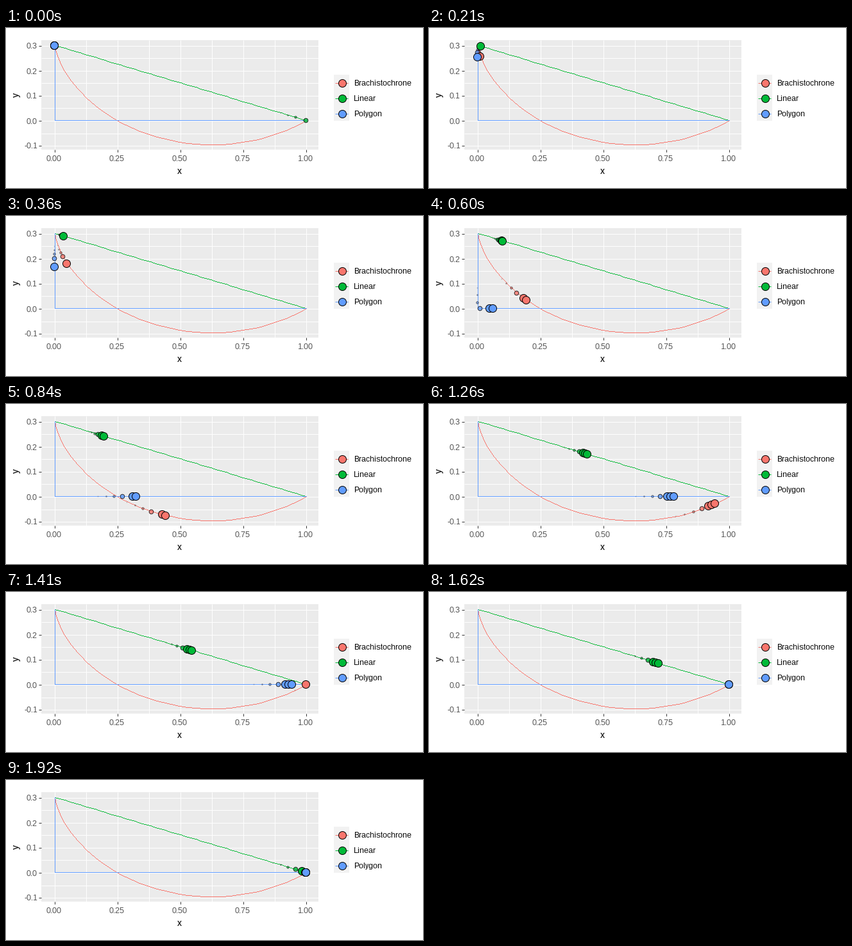
These frames come from a looping animation (650x250 px, 2.7 s). A matplotlib script:

```python
import numpy as np
import matplotlib.pyplot as plt
from matplotlib.animation import FuncAnimation
from matplotlib.colors import to_rgba
from matplotlib.patches import Rectangle

W, H, DPI = 650, 250, 100
PX = 72 / DPI
STEPS, FRAMES, INTERVAL = 64, 90, 30
RED, GREEN, BLUE = "#F8766D", "#00BA38", "#619CFF"
G, DROP = 9.8, 0.3
WAKE = 5
FULL = 6.0

plt.rcParams.update({
    "font.family": "Liberation Sans",
    "text.hinting": "native",
    "text.hinting_factor": 1,
})

# Cycloid through (0, DROP) and (1, 0), angle found by Newton's method
theta_end = 4.18
for _ in range(6):
    f = 1 - np.cos(theta_end) - DROP * (theta_end - np.sin(theta_end))
    theta_end -= f / (np.sin(theta_end) - DROP * (1 - np.cos(theta_end)))
R = 1 / (theta_end - np.sin(theta_end))

# Travel times in seconds
T_LINE = np.sqrt(2 * (1 + DROP ** 2) / (G * DROP))
T_FALL = np.sqrt(2 * DROP / G)
SPEED = np.sqrt(2 * G * DROP)
T_POLY = T_FALL + 1 / SPEED
T_CYC = theta_end * np.sqrt(R / G)


def cycloid(theta):
    return R * (theta - np.sin(theta)), DROP - R * (1 - np.cos(theta))


def brachistochrone(t):
    return cycloid(np.clip(t / T_CYC, 0, 1) * theta_end)


def linear(t):
    x = np.clip(t / T_LINE, 0, 1) ** 2
    return x, DROP * (1 - x)


def polygon(t):
    if t < T_FALL:
        return 0, DROP - G * max(t, 0) ** 2 / 2
    return min((t - T_FALL) * SPEED, 1), 0


RUNNERS = [
    (brachistochrone, T_CYC, RED),
    (linear, np.inf, GREEN),
    (polygon, T_POLY, BLUE),
]


def to_px(x, y):
    """Centre of the pixel that holds a data point."""
    return (np.floor(75.5 + 392 * np.asarray(x)) + 0.5,
            np.floor(144.5 - 391 * np.asarray(y)) + 0.5)


def seconds(step):
    return step * T_LINE / STEPS


def samples(step, age):
    """Moments drawn for a step: a cluster when current, one in the wake."""
    if age:
        return [seconds(step - 0.3 * (step < STEPS))]
    count = 1 + (step >= 16) + (step >= 36)
    return [seconds(step + 0.3 - 0.4 * k) for k in reversed(range(count))]


fig = plt.figure(figsize=(W / DPI, H / DPI), dpi=DPI, facecolor="white")
ax = fig.add_axes([0, 0, 1, 1])
ax.set(xlim=(0, W), ylim=(H, 0))
ax.axis("off")


def box(x, y, w, h, color):
    ax.add_patch(Rectangle((x, y), w, h, fc=color, ec="none", lw=0, zorder=0))


def line(x, y, color, z=2):
    ax.plot(x, y, color=color, lw=0.99 * PX, zorder=z, snap=True,
            solid_capstyle="butt")


def track(x, y, color):
    """Polyline drawn pixel by pixel, without smoothing."""
    pts = np.column_stack(to_px(x, y))
    dots = []
    for a, b in zip(pts, pts[1:]):
        n = int(np.abs(b - a).max()) + 1
        dots.append(np.floor(np.linspace(a, b, n)) + 0.5)
    ax.plot(*np.vstack(dots).T, ",", color=color, zorder=2)


def text(x, y, s, size, color="black", **kw):
    ax.text(x, y, s, fontsize=size * PX, color=color,
            va=kw.pop("va", "center_baseline"), **kw)


def area(radius):
    return (2 * np.asarray(radius) * PX) ** 2


# Panel, grid and axes
LEFT, RIGHT, TOP, BOTTOM = 55, 487, 19, 190
box(LEFT, TOP, RIGHT - LEFT, BOTTOM - TOP, "#EBEBEB")
for v in np.arange(9) / 8:
    x, _ = to_px(v, 0)
    line([x, x], [TOP, BOTTOM], "white", 1)
for v in np.arange(-2, 7) / 20:
    _, y = to_px(0, v)
    line([LEFT, RIGHT], [y, y], "white", 1)

for v in np.arange(5) / 4:
    x, _ = to_px(v, 0)
    line([x, x], [BOTTOM, BOTTOM + 4], "#333333")
    text(x - 1, 203.5, f"{v:.2f}", 12, "#4D4D4D", ha="center")
for v in np.arange(-1, 4) / 10:
    _, y = to_px(0, v)
    line([LEFT - 4, LEFT], [y, y], "#333333")
    text(49, y + 0.5, f"{v:.1f}", 12, "#4D4D4D", ha="right")
text(270, 223, "x", 14.67, ha="center")
text(16, 104.5, "y", 14.67, ha="center", va="center", rotation=90)

track(*cycloid(np.linspace(0, theta_end, 50)), RED)
track(*linear(T_LINE * np.sqrt(np.linspace(0, 1, 51))), GREEN)
track([0, 0, 1], [DROP, 0, 0], BLUE)

# Legend
for i, (name, color) in enumerate([("Brachistochrone", RED),
                                   ("Linear", GREEN), ("Polygon", BLUE)]):
    y = 85.5 + 24 * i
    box(511, y - 12.5, 24, 24, "#F2F2F2")
    line([513, 533], [y, y], color)
    ax.scatter([523.5], [y], s=area(FULL), c=color, edgecolors="black",
               linewidths=PX, zorder=3)
    text(542, y + 0.5, name, 12, ha="left")

balls = ax.scatter([], [], linewidths=PX, zorder=5)


def draw(i):
    step = min(i, STEPS)
    points, radii, fills, edges = [], [], [], []

    def add(pos, color, scale):
        alpha = scale ** 0.35
        points.append(to_px(*pos))
        radii.append(0.47 + (FULL - 0.47) * scale)
        fills.append(to_rgba(color, alpha))
        edges.append((0, 0, 0, alpha))

    # The wake wraps round from the end of the run
    for age in range(WAKE - 1, -1, -1):
        past = (step - age) % (STEPS + 1)
        scale = (1 - age / WAKE) ** 3
        for path, end, color in RUNNERS:
            if seconds(past + 0.3) < end:
                for t in samples(past, age):
                    add(path(t), color, scale)
            elif age == 0:
                add((1, 0), color, 1)

    balls.set_offsets(points)
    balls.set_sizes(area(radii))
    balls.set_facecolors(fills)
    balls.set_edgecolors(edges)
    return balls,


anim = FuncAnimation(fig, draw, frames=FRAMES, interval=INTERVAL, repeat=True)
plt.show()
```
